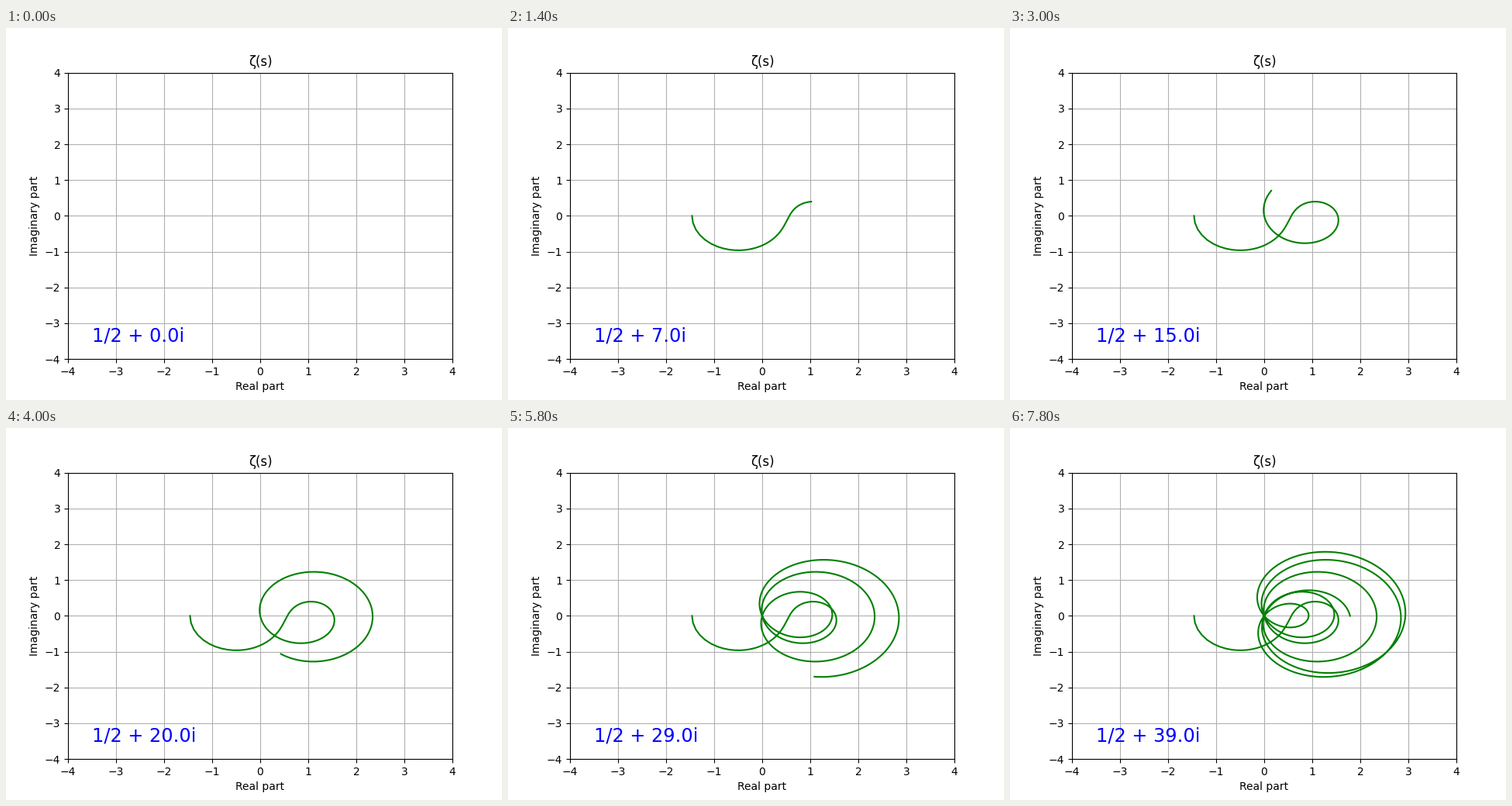
A matplotlib script that plays this animation: 640 px wide and 480 px high, repeating every 8 s.

```python
import numpy as np
import matplotlib.pyplot as plt
from matplotlib.animation import FuncAnimation

FRAMES = 40
INTERVAL = 200
STEPS = 20  # curve points per unit of t


def zeta(s, n=100):
    """Riemann zeta by Euler-Maclaurin summation."""
    k = np.arange(1, n)
    total = (k[None, :] ** -s[:, None]).sum(axis=1)
    tail = n ** (1 - s) / (s - 1) + n ** -s / 2
    tail += s * n ** (-s - 1) / 12
    tail -= s * (s + 1) * (s + 2) * n ** (-s - 3) / 720
    return total + tail


t = np.arange((FRAMES - 1) * STEPS + 1) / STEPS
curve = zeta(0.5 + 1j * t)

fig, ax = plt.subplots(figsize=(6.4, 4.8), dpi=100)
ax.set(xlim=(-4, 4), ylim=(-4, 4), title="ζ(s)",
       xlabel="Real part", ylabel="Imaginary part")
ax.grid(True)
line, = ax.plot([], [], color="green", lw=1.5)
label = ax.text(-3.5, -3.5, "", color="blue", fontsize="xx-large")


def update(i):
    part = curve[:i * STEPS + 1] if i else curve[:0]
    line.set_data(part.real, part.imag)
    label.set_text(f"1/2 + {float(i):.1f}i")
    return line, label


anim = FuncAnimation(fig, update, frames=FRAMES, interval=INTERVAL,
                     repeat=True, repeat_delay=0)
plt.show()
```
